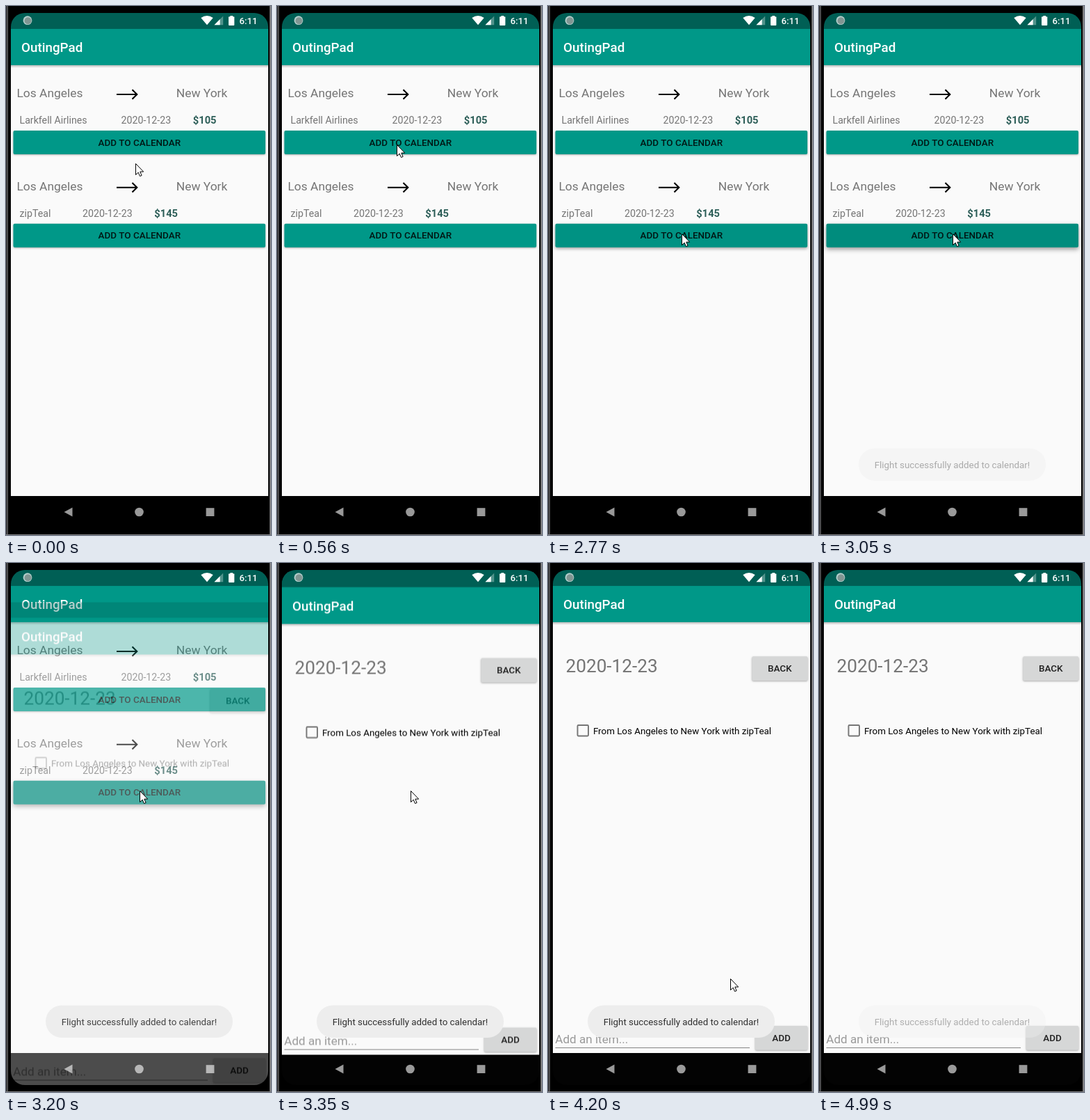
Animation, 381 px wide and 760 px high, one loop 5.09 s. Source, as an HTML page with a canvas:

```html
<!DOCTYPE html>
<html lang="en">
<head>
<meta charset="utf-8">
<title>Flight calendar</title>
<style>
html, body { margin: 0; width: 100%; height: 100%; overflow: hidden; background: #000; }
canvas { display: block; width: 381px; height: 760px; }
</style>
</head>
<body>
<canvas id="stage"></canvas>
<script>
const W = 381, H = 760, LOOP = 5090;
const TEAL = '#009888', DARK_TEAL = '#005f55', PAPER = '#fafafa', GREY = '#757575', INK = 'rgba(0,0,0,.85)';
const canvas = document.getElementById('stage');
const dpr = window.devicePixelRatio || 1;
canvas.width = W * dpr;
canvas.height = H * dpr;
const ctx = canvas.getContext('2d');

// Stepped tracks: [start ms, value...]
const CURSOR = [
  [0, 186, 226], [130, 181, 216], [280, 178, 212], [430, 175, 205], [560, 172, 199],
  [1270, 174, 211], [1390, 180, 246], [1510, 188, 292], [1660, 191, 316], [1790, 192, 327],
  [3780, 206, 388], [3930, 218, 414], [4060, 226, 431], [4200, 262, 597],
  [4320, 262, 674], [4440, 259, 725], [4590, 256, 746], [4710, 256, 800]
];
const PRESS = [[0, 0], [2770, .5], [2900, 1]];
const TOAST = [[0, 0], [3050, .38], [3200, .9], [3350, 1], [4590, .97], [4710, .85], [4860, .6], [4990, .36]];
const PAGE = [[0, 0, 0], [3200, .3, 46.5], [3350, 1, 2.5], [3480, 1, 0]]; // alpha, offset

function at(track, t) {
  let row = track[0];
  for (const r of track) if (r[0] <= t) row = r;
  return row.slice(1);
}

function rect(x, y, w, h, color) {
  ctx.fillStyle = color;
  ctx.fillRect(x, y, w, h);
}

function roundPath(x, y, w, h, r) {
  ctx.beginPath();
  ctx.moveTo(x + r, y);
  ctx.arcTo(x + w, y, x + w, y + h, r);
  ctx.arcTo(x + w, y + h, x, y + h, r);
  ctx.arcTo(x, y + h, x, y, r);
  ctx.arcTo(x, y, x + w, y, r);
  ctx.closePath();
}

function poly(points, color) {
  ctx.beginPath();
  points.forEach(([x, y]) => ctx.lineTo(x, y));
  ctx.closePath();
  ctx.fillStyle = color;
  ctx.fill();
}

function disc(x, y, r, color) {
  ctx.beginPath();
  ctx.arc(x, y, r, 0, Math.PI * 2);
  ctx.fillStyle = color;
  ctx.fill();
}

function text(str, x, y, size, color, weight = 400, align = 'left') {
  ctx.font = `${weight} ${size}px Roboto, sans-serif`;
  ctx.textAlign = align;
  ctx.fillStyle = color;
  ctx.fillText(str, x, y);
}

function button(label, x, y, w, h, color, lift = 0) {
  ctx.save();
  ctx.shadowColor = `rgba(0,0,0,${.32 + lift * .06})`;
  ctx.shadowBlur = (2.5 + lift * 4) * dpr;
  ctx.shadowOffsetY = (1 + lift * 2) * dpr;
  roundPath(x, y, w, h, 2);
  ctx.fillStyle = color;
  ctx.fill();
  ctx.restore();
  if (lift) {
    roundPath(x, y, w, h, 2);
    ctx.fillStyle = `rgba(0,0,0,${lift * .08})`;
    ctx.fill();
  }
  text(label, x + w / 2, Math.floor(y + h / 2 + 5), 13.45, INK, 500, 'center');
}

function frame(nav) {
  rect(7, 85, 370, 619, PAPER);
  rect(7, 10, 370, 22.5, DARK_TEAL);
  const shade = ctx.createLinearGradient(0, 85, 0, 89);
  shade.addColorStop(0, 'rgba(0,0,0,.26)');
  shade.addColorStop(1, 'rgba(0,0,0,0)');
  rect(7, 85, 370, 4, shade);
  rect(7, 32.5, 370, 52.5, TEAL);
  rect(7, 704, 370, 47, nav);
  text('OutingPad', 22, 66.2, 18.8, '#fff', 500);
}

function flight(y, airline, dateX, price, priceX, lift) {
  text('Los Angeles', 15.5, y + 131, 17.4, GREY);
  text('New York', 244.8, y + 131, 17.4, GREY);
  ctx.beginPath();
  ctx.moveTo(159, y + 127);
  ctx.lineTo(188, y + 127);
  ctx.moveTo(181.5, y + 120.3);
  ctx.lineTo(188.3, y + 127);
  ctx.lineTo(181.5, y + 133.7);
  ctx.strokeStyle = '#000';
  ctx.lineWidth = 2.1;
  ctx.stroke();
  text(airline, 19.5, y + 169, 14.2, GREY);
  text('2020-12-23', dateX, y + 169, 14.2, GREY);
  text(price, priceX, y + 169, 14.7, '#2e5f59', 700);
  button('ADD TO CALENDAR', 10.5, y + 179, 362.5, 34, TEAL, lift);
}

function listPage(press) {
  frame('#000');
  flight(0, 'Larkfell Airlines', 165.5, '$105', 268.8, 0);
  flight(133.7, 'zipTeal', 110, '$145', 213.3, press);
}

function dayPage() {
  frame('#030303');
  text('2020-12-23', 25.5, 157.3, 26.2, GREY);
  button('BACK', 293.3, 134.3, 80, 34.7, '#d6d7d7');
  roundPath(42.5, 233, 15.5, 15.5, 1.2);
  ctx.strokeStyle = GREY;
  ctx.lineWidth = 1.9;
  ctx.stroke();
  text('From Los Angeles to New York with zipTeal', 64.9, 245.7, 13.37, '#000');
  text('Add an item...', 10.3, 690, 17.1, '#9a9a9a');
  rect(10.5, 696, 279.5, 1, '#858585');
  button('ADD', 297.8, 665, 75.4, 34.7, '#d6d7d7');
}

function statusIcons() {
  disc(31, 20.7, 6.4, 'rgba(255,255,255,.7)');
  disc(31.5, 21.2, 5, 'rgba(125,145,141,.9)');
  ctx.beginPath();
  ctx.moveTo(289, 27.3);
  ctx.lineTo(280.3, 17);
  ctx.quadraticCurveTo(289, 10.8, 297.7, 17);
  ctx.closePath();
  ctx.fillStyle = '#fff';
  ctx.fill();
  poly([[299.5, 27.2], [312.2, 27.2], [312.2, 14.4]], 'rgba(255,255,255,.32)');
  poly([[299.5, 27.2], [307.6, 27.2], [307.6, 19]], '#fff');
  rect(322.4, 14, 3.6, 2, '#fff');
  roundPath(320, 15.3, 8.3, 12.7, 1);
  ctx.fillStyle = '#fff';
  ctx.fill();
  text('6:11', 335.6, 26, 13.1, '#fff', 500);
}

function navIcons() {
  const c = 'rgba(255,255,255,.6)';
  poly([[83.5, 727], [95.5, 720.6], [95.5, 733.4]], c);
  disc(191.5, 727, 6.3, c);
  rect(287.6, 721.2, 11.8, 11.8, c);
}

function toast(alpha) {
  if (!alpha) return;
  ctx.save();
  ctx.globalAlpha = alpha;
  roundPath(57, 635.5, 269, 46.5, 23);
  ctx.fillStyle = '#ededed';
  ctx.fill();
  text('Flight successfully added to calendar!', 191.5, 664, 13.35, '#303030', 400, 'center');
  ctx.restore();
}

function cursor([x, y]) {
  ctx.save();
  ctx.translate(x + .5, y + .5);
  poly([[0, 0], [0, 16], [3.7, 12.6], [6, 18], [8.6, 17], [6.3, 11.6], [11.2, 11.6]], '#fff');
  ctx.strokeStyle = '#000';
  ctx.lineWidth = 1;
  ctx.stroke();
  ctx.restore();
}

function bezel() {
  rect(0, 0, W, H, '#000');
  rect(0, 0, 2, H, '#38383b');
  rect(2, 0, 1, H, '#5c5c5e');
  rect(379, 0, 2, H, '#7c7c7e');
  rect(0, 759, W, 1, '#7c7c7e');
}

// The incoming page is composited as one layer so its parts fade together.
const layer = document.createElement('canvas');
layer.width = canvas.width;
layer.height = canvas.height;
const layerCtx = layer.getContext('2d');

function draw(t) {
  ctx.setTransform(dpr, 0, 0, dpr, 0, 0);
  bezel();
  ctx.save();
  roundPath(7, 10, 370, 740, 20);
  ctx.clip();
  const [alpha, offset] = at(PAGE, t);
  if (alpha < 1 || offset) listPage(at(PRESS, t)[0]);
  if (alpha) {
    ctx.globalAlpha = alpha;
    ctx.drawImage(layer, 0, offset, W, H);
    ctx.globalAlpha = 1;
  }
  statusIcons();
  navIcons();
  ctx.restore();
  toast(at(TOAST, t)[0]);
  cursor(at(CURSOR, t));
}

function renderLayer() {
  ctx.setTransform(dpr, 0, 0, dpr, 0, 0);
  ctx.clearRect(0, 0, W, H);
  dayPage();
  layerCtx.clearRect(0, 0, layer.width, layer.height);
  layerCtx.drawImage(canvas, 0, 0);
}

let start = null;
function tick(now) {
  if (start === null) start = now;
  draw(Math.max(0, now - start) % LOOP);
  requestAnimationFrame(tick);
}

renderLayer();
draw(0);
requestAnimationFrame(tick);
</script>
</body>
</html>
```
